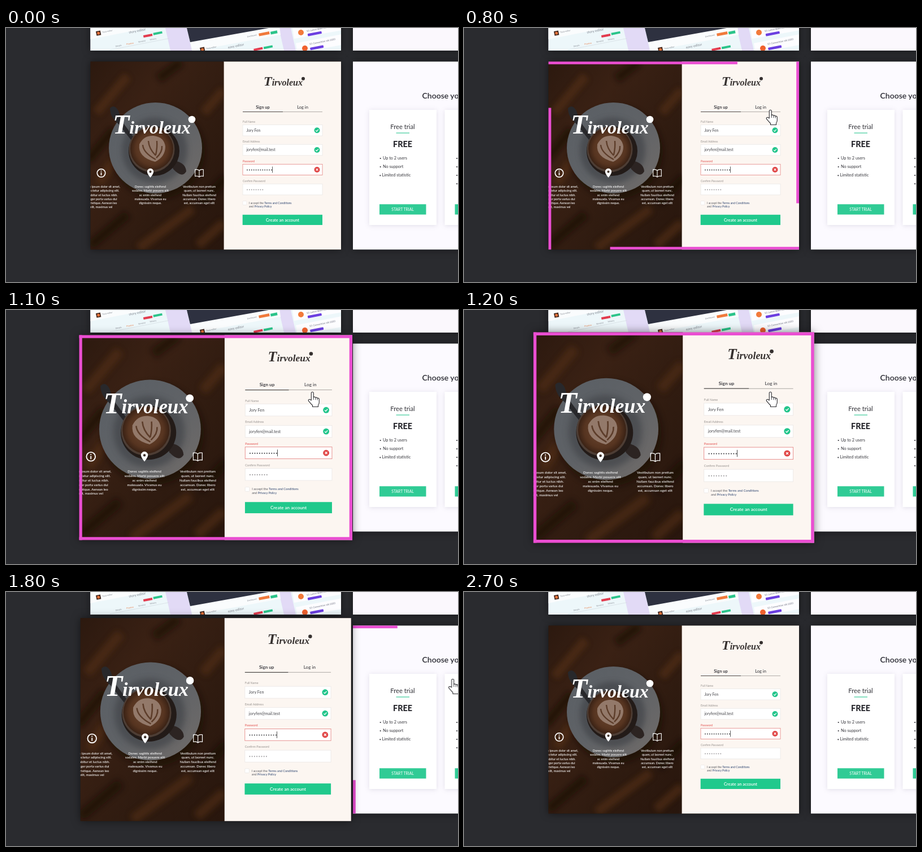
An HTML page that plays this animation: 800 by 450 pixels, repeating every 2800 ms.

```html
<!DOCTYPE html>
<html lang="en">
<head>
<meta charset="utf-8">
<title>Hover cards</title>
<style>
  html, body { margin: 0; width: 100%; height: 100%; overflow: hidden; background: #2a2b2f; }
  svg { display: block; width: 800px; height: 450px; font-family: Lato, sans-serif; }
  .anim, .frame line { animation: 2800ms linear infinite paused; animation-delay: calc(var(--t, 0) * -1ms); }
  .zoom { animation-name: zoom; transform-origin: 371.4px 226px; }
  .hand { animation-name: hand; }
  .frame { stroke: #ea4ed2; stroke-width: 4.8; fill: none; }
  .frame line { stroke-dasharray: 1 2; stroke-dashoffset: 1; }
  .first line { animation-name: draw; }
  .second line { animation-name: start; }
  .card { filter: drop-shadow(0 0 7px rgba(0, 0, 0, .5)); }
  .plan { fill: #fff; filter: drop-shadow(0 1px 4px rgba(60, 50, 90, .14)); }
  .field { fill: #fff; stroke: #ece8e6; stroke-width: .8; }
  .mid { text-anchor: middle; }
  .word { font-family: "Liberation Serif", serif; font-weight: bold; font-style: italic; }
  .label { font-size: 5px; fill: #97928f; }
  .value { font-size: 6.7px; fill: #45454a; }
  .list { font-size: 7.3px; fill: #35353b; }

  @keyframes zoom {
    0%, 33.93% { transform: scale(1); }
    35.71% { transform: scale(1.027); }
    39.29% { transform: scale(1.09); }
    42.86%, 58.93% { transform: scale(1.12); }
    60.71% { transform: scale(1.11); }
    64.29% { transform: scale(1.08); }
    67.86% { transform: scale(1.025); }
    71.43%, 100% { transform: scale(1); }
  }
  @keyframes draw {
    0%, 23.2% { stroke-dashoffset: 1; animation-timing-function: ease; }
    35%, 58.93% { stroke-dashoffset: 0; }
    58.94%, 100% { stroke-dashoffset: 1; }
  }
  @keyframes start {
    0%, 58.93% { stroke-dashoffset: 1; }
    64.29%, 66% { stroke-dashoffset: .822; }
    66.01%, 100% { stroke-dashoffset: 1; }
  }
  @keyframes hand {
    0%, 18% { transform: translate(830px, 168px); }
    21.43% { transform: translate(775px, 160px); }
    25% { transform: translate(610px, 149px); }
    28.57%, 57.14% { transform: translate(534px, 144px); }
    60.71% { transform: translate(640px, 147px); }
    64.29% { transform: translate(782.5px, 153px); }
    67.86%, 100% { transform: translate(830px, 157px); }
  }
</style>
</head>
<body>
<svg viewBox="0 0 800 450">
  <defs>
    <clipPath id="photo"><rect x="149.5" y="59.5" width="236" height="333"/></clipPath>
    <clipPath id="top"><rect x="149.5" y="0" width="443.5" height="40"/></clipPath>
    <linearGradient id="wood" x1="0" y1="0" x2="1" y2="1">
      <stop offset="0" stop-color="#2c190f"/>
      <stop offset=".3" stop-color="#3a2114"/>
      <stop offset=".65" stop-color="#2f1b10"/>
      <stop offset="1" stop-color="#28160d"/>
    </linearGradient>
    <linearGradient id="plate" x1="0" y1="0" x2="1" y2="1">
      <stop offset="0" stop-color="#5a5f65"/>
      <stop offset=".5" stop-color="#5f6266"/>
      <stop offset="1" stop-color="#716c69"/>
    </linearGradient>
    <radialGradient id="coffee">
      <stop offset="0" stop-color="#6f4a33"/>
      <stop offset=".75" stop-color="#563420"/>
      <stop offset="1" stop-color="#3a2215"/>
    </radialGradient>
    <filter id="soft" x="-20%" y="-20%" width="140%" height="140%"><feGaussianBlur stdDeviation="5"/></filter>
    <g id="tick">
      <circle r="5" fill="#22c58b"/>
      <path d="M-2.3 .2L-.6 1.8L2.4-1.6" fill="none" stroke="#fff" stroke-width="1.2"/>
    </g>
  </defs>

  <rect width="800" height="450" fill="#2a2b2f"/>

  <!-- upper row -->
  <rect class="card" x="149.5" y="-20" width="443.5" height="60" fill="#e2daf6"/>
  <g clip-path="url(#top)">
    <path d="M149 0H282L291 40H149Z" fill="#edf7fa"/>
    <path d="M149 0H250L149 20Z" fill="#fafcfd"/>
    <path d="M320 0H483L492 40H329Z" fill="#edf7fa"/>
    <path d="M326 25L484-4L486 12L330 41Z" fill="#fafcfd"/>
    <path d="M320 0H465L326 25Z" fill="#2e3140"/>
    <path d="M504 0H594V40H513Z" fill="#edf7fa"/>
    <path d="M507 0H594V4L510 19ZM513 27L594 11V30L516 44Z" fill="#fdfdff"/>
    <g transform="translate(159 6) rotate(-11)" font-size="3.6" fill="#80858e">
      <rect width="8" height="8" fill="#45291f"/>
      <circle cx="4" cy="4" r="2.5" fill="#e8743b"/>
      <text x="11" y="5">Tasty editor</text>
      <text x="57" y="15" font-size="6">story editor</text>
      <rect x="81" y="23" width="16" height="4" fill="#e23b4e"/>
      <rect x="99" y="22" width="16" height="4" fill="#2bc48a"/>
      <text x="29" y="34">Details</text>
      <text x="49" y="34" fill="#e8743b">Preview</text>
      <text x="70" y="34">Versions</text>
      <text x="91" y="34">History</text>
      <path d="M18 37H125" stroke="#d5dde2" stroke-width=".7"/>
    </g>
    <g transform="translate(343 35) rotate(-11)" font-size="3.6" fill="#80858e">
      <rect width="8" height="8" fill="#45291f"/>
      <circle cx="4" cy="4" r="2.5" fill="#e8743b"/>
      <text x="11" y="5">Tasty editor</text>
      <text x="49" y="11" font-size="6">easy editor</text>
      <text x="86" y="-2">Dashboard</text>
      <rect x="107" y="-5" width="19" height="5" fill="#f07a3c"/>
      <rect x="128" y="-4" width="12" height="5" fill="#2bc48a"/>
      <rect x="93" y="20" width="16" height="4" fill="#e23b4e"/>
      <rect x="111" y="20" width="16" height="4" fill="#2bc48a"/>
    </g>
    <g font-size="4.2" fill="#666978">
      <circle cx="522" cy="8" r="5" fill="#f27a3a"/>
      <circle cx="529" cy="36" r="5" fill="#f0622f"/>
      <g transform="translate(532 7) rotate(-11)">
        <text>10. Lorem ipsum dolor</text>
        <rect x="1" y="3.5" width="25" height="4.5" rx="1" fill="#6b3fe0"/>
      </g>
      <g transform="translate(537 30) rotate(-11)">
        <text>10. Consectetur elit 2020</text>
        <rect y="5" width="24" height="4.5" rx="1" fill="#6b3fe0"/>
      </g>
    </g>
  </g>
  <rect class="card" x="614" y="-20" width="443" height="60" fill="#fbf8fd"/>

  <!-- pricing card -->
  <rect class="card" x="614" y="59.5" width="443" height="333" fill="#fcfaff"/>
  <text x="736.5" y="125" font-size="14" font-weight="600" fill="#2b2b33">Choose your pricing plan</text>
  <rect class="plan" x="643" y="145" width="119" height="204"/>
  <rect class="plan" x="776.5" y="145" width="119" height="204"/>
  <text class="mid" x="702" y="178.5" font-size="11.2" fill="#303036">Free trial</text>
  <path d="M690.5 186H714" stroke="#3ccb9a" stroke-width="1.2"/>
  <text class="mid" x="702" y="210.5" font-size="14.4" font-weight="800" fill="#25252b">FREE</text>
  <g class="list">
    <text x="667" y="233">Up to 2 users</text>
    <text x="667" y="248.2">No support</text>
    <text x="665.5" y="263.3">Limited statistic</text>
  </g>
  <g fill="#35353b">
    <circle cx="662.7" cy="231" r="1.1"/><circle cx="662.7" cy="246" r="1.1"/><circle cx="662.3" cy="261.3" r="1.1"/>
    <circle cx="798" cy="231" r="1.1"/><circle cx="798" cy="246" r="1.1"/>
    <circle cx="798" cy="261" r="1.1"/><circle cx="798" cy="276" r="1.1"/>
  </g>
  <path d="M661 312.3H743.5V330.5H661ZM794.5 312.3H877V330.5H794.5Z" fill="#30cb95"/>
  <text class="mid" x="702" y="324" font-size="6.8" fill="#fff">START TRIAL</text>
  <g class="frame second" transform="translate(614 59.5)">
    <line x1="0" y1="2.4" x2="443" y2="2.4" pathLength="1"/>
    <line x1="2.4" y1="333" x2="2.4" y2="0" pathLength="1"/>
  </g>

  <!-- sign-up card -->
  <g class="anim zoom">
    <rect class="card" x="149.5" y="59.5" width="443.5" height="333" fill="#2b190f"/>
    <rect x="385.5" y="59.5" width="207.5" height="333" fill="#fcf6f1"/>
    <g clip-path="url(#photo)">
      <rect x="149.5" y="59.5" width="236" height="333" fill="url(#wood)"/>
      <g filter="url(#soft)" fill="none" stroke-width="16" opacity=".6">
        <path d="M160 150L215 85M165 275L190 235M235 390L330 320M340 385L385 345M350 150L385 110" stroke="#563019"/>
        <path d="M145 235L190 180M270 90L310 60M150 385L215 330M345 310L390 265" stroke="#170c06"/>
      </g>
      <circle cx="269" cy="220" r="83" fill="#120a06" opacity=".55" filter="url(#soft)"/>
      <ellipse cx="264.5" cy="212.5" rx="82.5" ry="80.5" fill="url(#plate)"/>
      <circle cx="263" cy="217" r="58" fill="#3f4246" opacity=".65" filter="url(#soft)"/>
      <path d="M184 142Q192 134 199 147L205 165L230 199L225 203L199 170Q184 158 184 142Z" fill="#28282b"/>
      <path d="M290 234Q318 236 319 254Q312 267 296 250Z" fill="#2c2422"/>
      <ellipse cx="262" cy="218" rx="45" ry="44" fill="#231b18"/>
      <circle cx="258" cy="215" r="40.5" fill="#4d3d34"/>
      <circle cx="258" cy="214" r="38" fill="url(#coffee)"/>
      <path d="M264 237Q233 229 236 206Q244 190 261 191Q280 193 282 210Q282 228 264 237Z" fill="#93796a"/>
      <path d="M265 233Q243 221 242 207M265 226Q253 214 252 200M265 225Q268 212 267 200M266 230Q277 220 276 209" fill="none" stroke="#5d3d2a" stroke-width="2.4"/>

      <text class="word" x="189" y="187" font-size="32" fill="#fff"><tspan font-size="48">T</tspan>irvoleux</text>
      <circle cx="329" cy="162" r="6.3" fill="#fff"/>

      <g fill="none" stroke="#fff" stroke-width="1.7">
        <circle cx="168.5" cy="257" r="7.2"/>
        <path d="M168.5 255.8V261M168.5 252.6V254.3"/>
        <path d="M342 252.5V264M334.7 250.8Q339.5 250 342 252.5Q344.5 250 349.3 250.8V262.6Q344.5 261.5 342 264Q339.5 261.5 334.7 262.6Z" stroke-width="1.1"/>
      </g>
      <path fill-rule="evenodd" fill="#fff" d="M255.5 265Q249.8 258 249.8 254.5A5.7 5.7 0 0 1 261.2 254.5Q261.2 258 255.5 265ZM255.5 252.5A2.1 2.1 0 1 0 255.5 256.7A2.1 2.1 0 1 0 255.5 252.5Z"/>
      <g id="columns" class="mid" font-size="5.5" font-weight="500" fill="#fff"></g>
    </g>

    <text class="word" x="456" y="102" font-size="16" fill="#35302f"><tspan font-size="24">T</tspan>irvoleux</text>
    <circle cx="526" cy="89.7" r="3" fill="#35302f"/>

    <g class="mid" font-size="7.5" fill="#3b3b40">
      <text x="454.5" y="142.7" font-weight="bold">Sign up</text>
      <text x="525" y="142.7" font-weight="500">Log in</text>
    </g>
    <path d="M490 148.5H560" stroke="#aaa6a3" stroke-width=".9"/>
    <path d="M419 148.5H490" stroke="#4e4b4a" stroke-width="1.1"/>

    <g class="label">
      <text x="419" y="168">Full Name</text>
      <text x="419" y="202.5">Email Address</text>
      <text x="419" y="237.5" fill="#e2504e">Password</text>
      <text x="419" y="272.5">Confirm Password</text>
    </g>
    <rect class="field" x="419" y="171.5" width="141" height="19.5"/>
    <rect class="field" x="419" y="206.3" width="141" height="19.5"/>
    <rect class="field" x="419" y="241.3" width="141" height="19.2" style="stroke:#e58583"/>
    <rect class="field" x="419" y="276.2" width="141" height="19.5"/>
    <g class="value">
      <text x="425.5" y="183.7">Jory Fen</text>
      <text x="425.5" y="218.3">joryfen@mail.test</text>
    </g>
    <g fill="none" stroke-linecap="round" stroke-width="2">
      <path d="M427 251.5H470" stroke="#4a4a4e" stroke-dasharray="0 3.9"/>
      <path d="M427 286.5H455" stroke="#a3a1a3" stroke-dasharray="0 3.9"/>
    </g>
    <path d="M471.5 245.5V256.5" stroke="#333" stroke-width=".8"/>
    <use href="#tick" x="550.5" y="181.3"/>
    <use href="#tick" x="550.5" y="216"/>
    <circle cx="550.5" cy="251" r="5" fill="#e04545"/>
    <path d="M548.7 249.2L552.3 252.8M552.3 249.2L548.7 252.8" stroke="#fff" stroke-width="1.2"/>

    <rect class="field" x="419" y="306.5" width="7" height="7" rx="1"/>
    <g font-size="5.1" fill="#55565c">
      <text x="430" y="311.7">I accept the <tspan fill="#2d4570">Terms and Conditions</tspan></text>
      <text x="430" y="318">and <tspan fill="#2d4570">Privacy Policy</tspan></text>
    </g>
    <rect x="418.7" y="330.8" width="141.3" height="18.2" fill="#20c98c"/>
    <text class="mid" x="489.5" y="342.5" font-size="7.4" font-weight="600" fill="#fff">Create an account</text>

    <g class="frame first" transform="translate(149.5 59.5)">
      <line x1="0" y1="2.4" x2="443.5" y2="2.4" pathLength="1"/>
      <line x1="441.1" y1="0" x2="441.1" y2="333" pathLength="1"/>
      <line x1="443.5" y1="330.6" x2="0" y2="330.6" pathLength="1"/>
      <line x1="2.4" y1="333" x2="2.4" y2="0" pathLength="1"/>
    </g>
  </g>

  <g class="anim hand" stroke="#2c2c30">
    <path d="M6.3 16V3.2A2 2 0 0 1 10.3 3.2V10.5Q12.8 9 14 11.2Q16.3 10.2 17.3 12.3Q20.3 11.6 20.3 14.5V19.5Q20.3 22.500 18.5 24.5V27.5H8.5V25Q5 21.5 1.5 17.2Q.5 14.8 3 14.2Q4.5 14.2 6.3 16Z" fill="#fff" stroke-width="1.1" stroke-linejoin="round"/>
    <path d="M10.3 10.5V15M14 11.2V15.3M17.3 12.3V15.6" fill="none" stroke-width=".9"/>
  </g>
</svg>
<script>
  const columns = [
    [168.5, "Lorem ipsum dolor sit amet,|consectetur adipiscing elit.|Curabitur et luctus nibh.|Integer porta varius dui|at tristique. Aenean leo|elit, maximus vel"],
    [255.5, "Donec sagittis eleifend|sodales. Morbi posuere elit|ac enim eleifend|malesuada. Vivamus eu|dignissim neque."],
    [342, "Vestibulum non pretium|quam, ut laoreet nunc.|Nullam faucibus eleifend|accumsan. Donec libero|est, accumsan eget elit"]
  ];
  document.getElementById("columns").innerHTML = columns.map(([x, text]) =>
    text.split("|").map((line, i) => `<text x="${x}" y="${283.2 + i * 7.15}">${line}</text>`).join("")
  ).join("");

  // The picture advances ten times a second.
  const LOOP = 2800, STEP = 100;
  const began = performance.now();
  function tick() {
    const t = (performance.now() - began + 5) % LOOP;
    document.documentElement.style.setProperty("--t", Math.floor(t / STEP) * STEP);
    requestAnimationFrame(tick);
  }
  tick();
</script>
</body>
</html>
```
